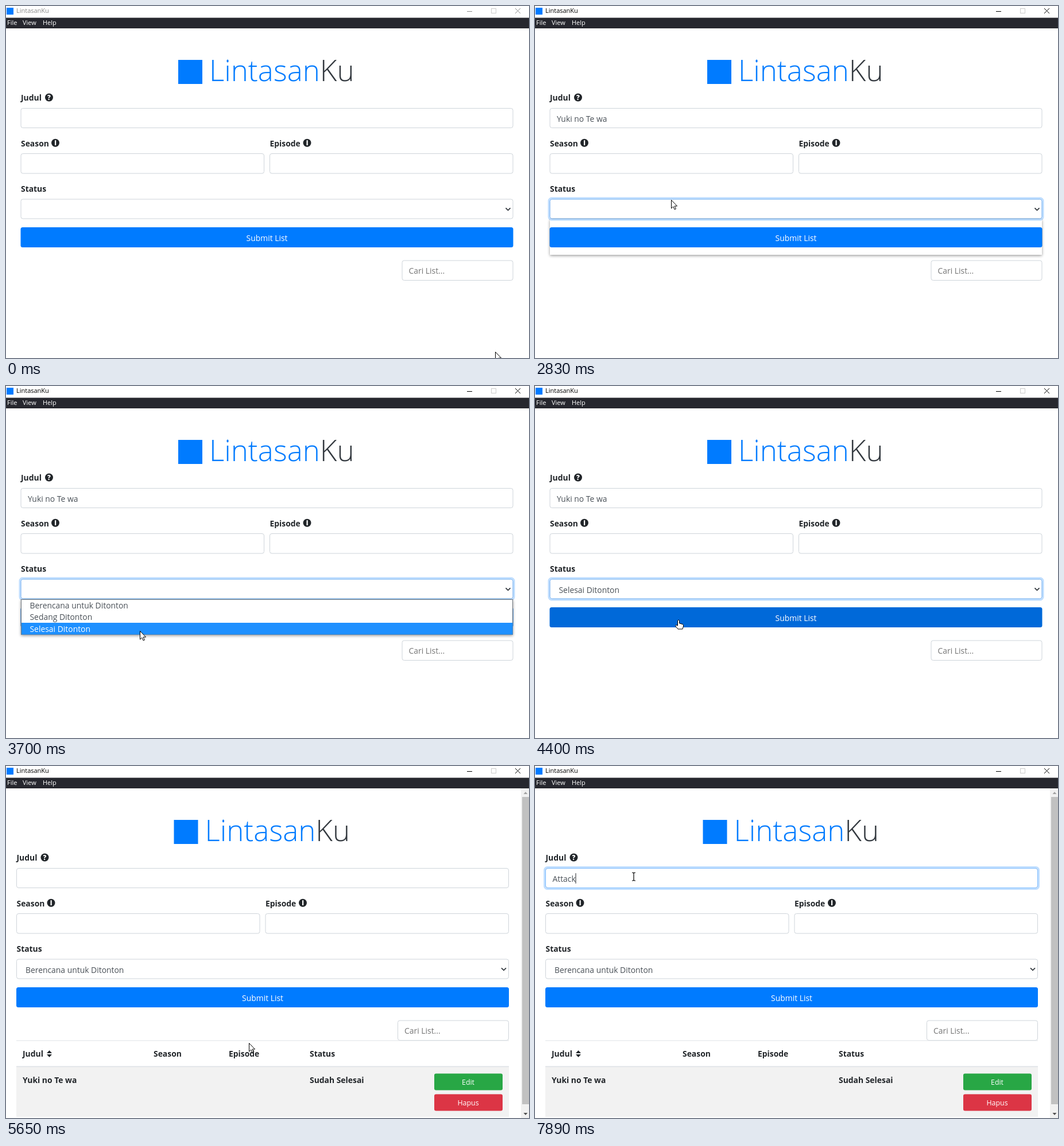
An HTML page for the animation above (8 s loop, 911x614 px).

```html
<!DOCTYPE html>
<html lang="id">
<head>
<meta charset="utf-8">
<title>LintasanKu</title>
<style>
html, body { margin: 0; width: 100%; height: 100%; overflow: hidden; background: #fff; }
svg { display: block; width: 911px; height: 614px; font: 13.9px "Open Sans", "Noto Sans", sans-serif; fill: #495057; }
text { white-space: pre; }
.small { font-size: 11px; }
.menu { fill: #fff; }
.bold { font-weight: 700; fill: #212529; }
.mid { text-anchor: middle; }
.white { fill: #fff; }
.field { fill: #fff; stroke: #ced4da; }
.ring { fill: none; stroke: #80bdff; }
.glow { fill: none; stroke: #007bff; stroke-opacity: .25; stroke-width: 3; }
.head { font-size: 51px; font-weight: 300; }
.badge { font-size: 11.5px; font-weight: 800; fill: #fff; text-anchor: middle; }
.line { fill: none; stroke: #343a40; stroke-width: 1.8; }
</style>
</head>
<body>
<svg viewBox="0 0 911 614">
  <defs>
    <clipPath id="outside"><path clip-rule="evenodd" d="M0 0H911V614H0ZM26 372H883V434H26Z"/></clipPath>
    <filter id="blur" x="-5%" y="-40%" width="110%" height="180%"><feGaussianBlur stdDeviation="2.8"/></filter>
  </defs>
  <rect width="911" height="614" fill="#fff"/>

  <!-- window chrome -->
  <rect x="1" y="3" width="12" height="12" fill="#007bff"/>
  <g id="chrome">
    <text class="small" x="18" y="12">LintasanKu</text>
    <path d="M803 9.5H812M887 4L896 13M896 4L887 13" fill="none" stroke="currentColor"/>
  </g>
  <rect x="845.5" y="4.5" width="8" height="8" fill="none" stroke="#ccc"/>
  <rect y="20.5" width="911" height="18.5" fill="#26272e"/>
  <g class="small menu"><text x="2" y="33">File</text><text x="29" y="33">View</text><text x="64" y="33">Help</text></g>

  <g id="page">
    <rect x="300" y="94" width="42" height="42" fill="#007bff"/>
    <text class="head" x="354" y="131" fill="#007bff">Lintasan<tspan fill="#343a40">Ku</tspan></text>

    <g class="bold">
      <text x="26" y="165">Judul</text><text x="26" y="244.5">Season</text>
      <text x="459.5" y="244.5">Episode</text><text x="26" y="323.5">Status</text>
      <circle cx="75" cy="159.5" r="7"/><circle cx="86" cy="238.7" r="7"/><circle cx="524.5" cy="238.7" r="7"/>
    </g>
    <text class="badge" x="75" y="163.8">?</text>
    <text class="badge" x="86" y="243">i</text>
    <text class="badge" x="524.5" y="243">i</text>

    <rect class="field" x="26" y="178.5" width="857" height="34" rx="3.5"/>
    <rect class="field" x="26" y="257.5" width="423.5" height="34.5" rx="3.5"/>
    <rect class="field" x="459.5" y="257.5" width="423.5" height="34.5" rx="3.5"/>
    <rect class="field" x="26" y="337" width="857" height="34" rx="3.5"/>
    <path class="line" d="M870.5 352.3L874.5 356.3L878.5 352.3"/>
    <rect class="field" x="690" y="444" width="193" height="34.5" rx="3.5"/>
    <text x="701.5" y="467" fill="#757575">Cari List...</text>

    <g id="titleRing"><rect class="ring" x="26" y="178.5" width="857" height="34" rx="3.5"/><rect class="glow" x="24" y="176.5" width="861" height="38" rx="5"/></g>
    <g id="selectRing"><rect class="ring" x="26" y="337" width="857" height="34" rx="3.5"/><rect class="glow" x="24" y="335" width="861" height="38" rx="5"/></g>
    <text id="title" x="38" y="202"></text>
    <rect id="caret" y="187" width="1" height="18" fill="#212529"/>
    <text id="status" x="41.5" y="360.5"></text>

    <rect id="submit" x="25.5" y="386" width="858" height="35" rx="3.5"/>
    <rect id="submitRing" x="24.5" y="385" width="860" height="37" rx="5" fill="none" stroke="#80bdff" stroke-width="3"/>
    <text class="mid white" x="454.5" y="409.5">Submit List</text>
  </g>

  <g id="result">
    <path d="M18 479H876" stroke="#dee2e6"/>
    <path d="M18 524.5H876" stroke="#dee2e6" stroke-width="2"/>
    <rect x="18" y="525.5" width="858" height="86.5" fill="#f2f2f2"/>
    <g class="bold">
      <text x="29" y="507">Judul</text><text x="257" y="507">Season</text>
      <text x="388" y="507">Episode</text><text x="529" y="507">Status</text>
      <path d="M71 501L75.5 496L80 501ZM71 503L75.5 508L80 503Z"/>
      <text x="29" y="553">Yuki no Te wa</text><text x="529" y="553">Sudah Selesai</text>
    </g>
    <rect x="746" y="536.5" width="119" height="29" rx="3" fill="#28a745"/>
    <rect x="746" y="572.5" width="119" height="29" rx="3" fill="#dc3545"/>
    <g class="mid white" font-size="12.4"><text x="805" y="556">Edit</text><text x="805" y="592">Hapus</text></g>
    <rect x="897" y="39" width="14" height="575" fill="#f1f1f1"/>
    <rect x="899" y="54" width="12" height="536" fill="#c1c1c1"/>
    <path d="M901.5 49L905 45L908.5 49Z" fill="#a3a3a3"/>
    <path d="M901.5 605L905 609L908.5 605Z" fill="#505050"/>
  </g>

  <g id="alert">
    <rect y="39" width="897" height="45.5" fill="#d4edda"/>
    <path d="M0 84H897" stroke="#c3e6cb"/>
    <text class="mid" x="446.5" y="67" fill="#155724">Tontonan Berhasil ditambahkan</text>
  </g>

  <g id="shadow" clip-path="url(#outside)"><rect x="26" y="373.5" width="857" height="62" fill="#000" opacity=".42" filter="url(#blur)"/></g>
  <g id="list">
    <rect x="26.5" y="372.5" width="856" height="61" fill="#fff" stroke="#6f767d"/>
    <rect id="mark" x="27" width="855.5" height="20.5" fill="#1e90ff"/>
    <g id="options"><text x="41.5" y="388">Berencana untuk Ditonton</text><text x="41.5" y="408.3">Sedang Ditonton</text><text x="41.5" y="428.6">Selesai Ditonton</text></g>
  </g>

  <g id="cursor" fill="#fff" stroke="#000">
    <path id="arrow" d="M.5 .5V15L3.8 11.9L6.2 17L8.4 16L6.1 11H10.6Z"/>
    <path id="beam" fill="none" stroke-width="1.2" d="M-3 -7H-1L0 -6L1 -7H3M-3 7H-1L0 6L1 7H3M0 -6V6"/>
    <path id="hand" d="M-1.5 1Q0 -1 1.5 1V6L7 7.5Q9 8 8.5 11L7 16H-1L-5.5 10.5Q-5 8 -1.5 10Z"/>
  </g>
</svg>
<script>
const LOOP = 8000;
const $ = id => document.getElementById(id);
const show = (id, on) => $(id).setAttribute("opacity", +on);
const ramp = (t, a, b) => Math.min(1, Math.max(0, (t - a) / (b - a)));
const within = (v, a, b) => v >= a && v < b;
const ease = p => p * p * (3 - 2 * p);

// time, x, y of the pointer
const path = [
  [0, 852, 603], [650, 225, 195], [2030, 225, 195], [2290, 430, 273],
  [2460, 430, 273], [2730, 237, 338], [2840, 237, 338], [3160, 235, 383],
  [3510, 235, 383], [3700, 233, 427], [4150, 233, 427], [4420, 250, 408],
  [5000, 250, 408], [5180, 427, 497], [5400, 427, 497], [5650, 423, 483],
  [5800, 355, 400], [5840, 355, 400], [6120, 172, 193], [LOOP, 172, 193]
];
const typing = [
  [0, ""], [1760, "Yuki no Te wa"], [4700, ""], [6480, "A"], [6680, "At"], [6920, "Att"],
  [6950, "Atta"], [7150, "Attac"], [7250, "Attacl"], [7740, "Attac"], [7890, "Attack"]
];
const choice = [[0, ""], [4150, "Selesai Ditonton"], [4700, ""], [5450, "Berencana untuk Ditonton"]];
const latest = (steps, t) => steps.filter(s => s[0] <= t).pop()[1];

function pointer(t) {
  const i = path.findIndex(p => p[0] > t);
  const [t0, x0, y0] = path[i - 1], [t1, x1, y1] = path[i];
  const p = ease(ramp(t, t0, t1));
  return [x0 + (x1 - x0) * p, y0 + (y1 - y0) * p];
}

function cursorKind(x, y, open) {
  if (open || x < 18 || x > 883) return "arrow";
  if (within(y, 178, 213) || within(y, 257, 292)) return "beam";
  if (within(y, 491, 514) && within(x, 388, 442)) return "beam";
  return within(y, 386, 421) ? "hand" : "arrow";
}

function draw(t) {
  const saved = t >= 4700, open = within(t, 2780, 4150);
  const tone = t < 1160 ? "#8a8a8a" : "#000";
  $("chrome").style.fill = $("chrome").style.color = tone;
  $("page").setAttribute("transform", `translate(${saved ? -7.5 : 0})`);
  show("result", saved);
  show("alert", ramp(t, 4690, 4780) * (1 - ramp(t, 5300, 5600)));

  $("title").textContent = latest(typing, t);
  $("status").textContent = latest(choice, t);
  $("caret").setAttribute("x", Math.round(38 + $("title").getComputedTextLength()));
  show("caret", within(t, 1190, 1660) || within(t, 1760, 2260) || t >= 6030);
  show("titleRing", t < 4000 ? ramp(t, 1130, 1190) * (1 - ramp(t, 2740, 2820)) : ramp(t, 6000, 6120));
  show("selectRing", ramp(t, 2740, 2820) * (1 - ramp(t, 4560, 4650)));

  const hover = within(t, 4280, 5420) || within(t, 5720, 5850);
  $("submit").setAttribute("fill", hover ? "#0069d9" : "#007bff");
  show("submitRing", ramp(t, 4560, 4680) * (1 - ramp(t, 5420, 5500)));

  const row = t < 3570 ? 0 : t < 3640 ? 1 : 2;
  show("shadow", open);
  show("list", open ? ramp(t, 2840, 2920) : 0);
  $("mark").setAttribute("y", 373 + row * 20);
  [...$("options").children].forEach((o, i) => o.setAttribute("fill", i === row ? "#fff" : "#495057"));

  const [x, y] = pointer(t), kind = cursorKind(x, y, open);
  $("cursor").setAttribute("transform", `translate(${Math.round(x)} ${Math.round(y)})`);
  for (const k of ["arrow", "beam", "hand"]) show(k, k === kind);
}

const start = performance.now();
function frame() {
  draw((performance.now() - start) % LOOP);
  requestAnimationFrame(frame);
}
frame();
</script>
</body>
</html>
```
